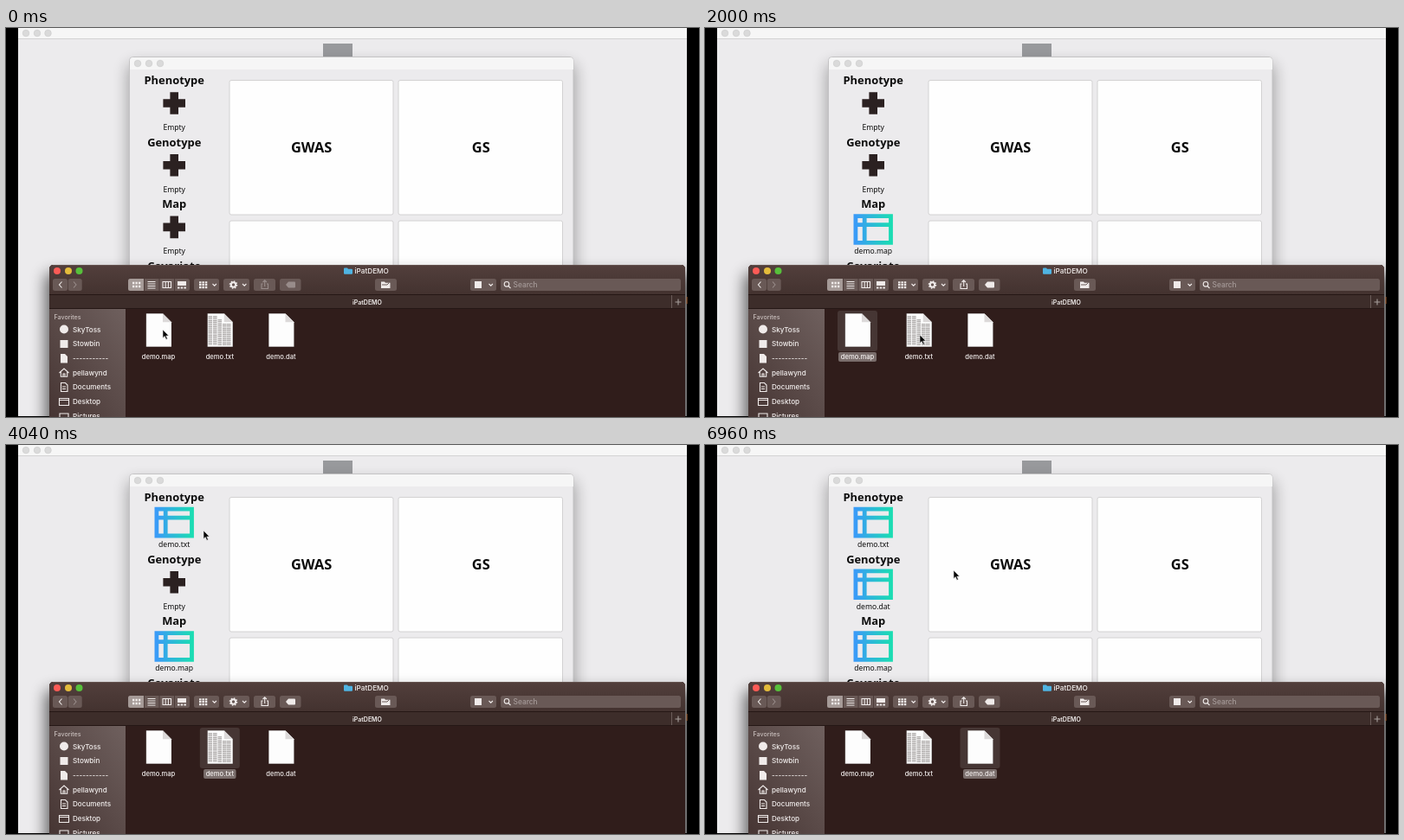
An HTML page that plays this animation: 800x450 px, repeating every 7000 ms.

```html
<!DOCTYPE html>
<html lang="en">
<head>
<meta charset="utf-8">
<style>
html, body { margin: 0; width: 100%; height: 100%; overflow: hidden; background: #000; }
svg { display: block; width: 800px; height: 450px; }
text { font-family: Inter, Roboto, sans-serif; fill: #f3efee; font-weight: 500; }
.app text { font-family: "Noto Sans", "Open Sans", sans-serif; fill: #0c0c0c; font-weight: 400; font-size: 8.6px; text-anchor: middle; }
.app .head { font-weight: 700; font-size: 12.9px; }
.app .big { font-weight: 700; font-size: 16.4px; }
.mid { text-anchor: middle; }
.side text { font-size: 8.1px; }
.btn { fill: #695956; }
.ico { fill: none; stroke: #f0ebea; stroke-width: 1.1; }
.solid { fill: #f0ebea; }
</style>
</head>
<body>
<svg viewBox="0 0 800 450" xmlns="http://www.w3.org/2000/svg">
  <defs>
    <linearGradient id="bar" x2="0" y2="1"><stop stop-color="#523f3c"/><stop offset="1" stop-color="#43322f"/></linearGradient>
    <linearGradient id="sideFill" y1="1" x2="1" y2="0"><stop stop-color="#463533"/><stop offset="1" stop-color="#6f605e"/></linearGradient>
    <linearGradient id="aqua"><stop stop-color="#3a9bf7"/><stop offset="1" stop-color="#1bdcb3"/></linearGradient>
    <filter id="soft" x="-20%" y="-20%" width="140%" height="140%"><feGaussianBlur stdDeviation="9"/></filter>
    <clipPath id="stage"><rect x="14" width="772" height="449"/></clipPath>
  </defs>

  <g class="app" clip-path="url(#stage)">
    <path fill="#ecebed" d="M14 0h772v450H14z"/>
    <path fill="#f6f6f6" d="M14 0h772v12H14z"/>
    <path fill="#d3d2d3" d="M14 12h772v1H14z"/>
    <g fill="#dadada" stroke="#c9c9c9" stroke-width=".6"><circle cx="23" cy="6" r="3.8"/><circle cx="36" cy="6" r="3.8"/><circle cx="48.5" cy="6" r="3.8"/></g>
    <rect x="366" y="18" width="34" height="34" fill="#98999c"/>
    <rect x="141" y="42" width="516" height="430" rx="5" opacity=".32" filter="url(#soft)"/>
    <rect x="142.5" y="33.5" width="512.5" height="430" rx="4" fill="#ecebed" stroke="#c4c3c4"/>
    <path fill="#f6f6f6" d="M143 48V38q0-4 4-4h504q4 0 4 4v10z"/>
    <g fill="#dadada" stroke="#c9c9c9" stroke-width=".6"><circle cx="152" cy="41" r="3.8"/><circle cx="165" cy="41" r="3.8"/><circle cx="178" cy="41" r="3.8"/></g>
    <g fill="#fefefe" stroke="#d2d1d2">
      <rect x="258" y="60.5" width="189" height="155.5" rx="2"/><rect x="453" y="60.5" width="189.5" height="155.5" rx="2"/>
      <rect x="258" y="223" width="189" height="155.5" rx="2"/><rect x="453" y="223" width="189.5" height="155.5" rx="2"/>
    </g>
    <text class="big" x="352.7" y="144">GWAS</text>
    <text class="big" x="548.3" y="144">GS</text>
    <g id="rows"></g>
  </g>

  <g clip-path="url(#stage)"><rect x="46" y="284" width="748" height="200" rx="5" opacity=".62" filter="url(#soft)"/></g>
  <path fill="#a8602f" d="M785.500 311h1v8h-1z"/>
  <g id="finder">
    <path fill="#301d1b" d="M50 450V279q0-5 5-5h724q5 0 5 5v171z"/>
    <path fill="url(#bar)" d="M50 309V279q0-5 5-5h724q5 0 5 5v30z"/>
    <path fill="#6a5854" d="M54 274h726v.8H54z"/>
    <path fill="#3d2d2a" d="M50 309h734v16H50z"/>
    <path stroke="#251715" d="M50 308.5h734M50 324.5h734"/>
    <path stroke="#6b5c59" d="M768.5 309v15"/>
    <path class="ico" d="M772.5 317h7M776 313.5v7" opacity=".6"/>
    <path fill="url(#sideFill)" d="M50 325h88v125H50z"/>
    <circle cx="59" cy="281" r="4" fill="#fc5b56"/><circle cx="72" cy="281" r="4" fill="#e4bc3b"/><circle cx="84.5" cy="281" r="4" fill="#57c13b"/>
    <path fill="#4fb4e2" d="M390 278.5q0-1 1-1h3l1 1.2h4q1 0 1 1v4q0 1-1 1h-8q-1 0-1-1z"/>
    <text x="402.5" y="284" font-size="8.2">iPatDEMO</text>
    <text class="mid" x="417" y="319.5" font-size="7" style="font-weight:600">iPatDEMO</text>

    <g id="buttons"></g>
    <path class="ico" d="M64.5 293.5l-3 3.5 3 3.5"/>
    <path class="ico" opacity=".35" d="M78 293.5l3 3.5-3 3.5"/>
    <path fill="#a59a97" d="M143.5 290h15.5v14h-15.5q-2.500 0-2.500-2.500v-9q0-2.500 2.500-2.500z"/>
    <path stroke="#4c3b38" d="M159.5 290v14M177 290v14M194.5 290v14"/>
    <path class="ico" style="stroke-width:2.3" stroke-dasharray="2.3 1.2" d="M146 295h9.5M146 299h9.5"/>
    <path class="ico" d="M163.5 293.5h9M163.5 296h9M163.5 298.5h9M163.5 301h9"/>
    <path class="ico" d="M181 293.5h9.5v7H181zM184.2 293.5v7M187.4 293.5v7"/>
    <path class="solid" d="M198 293h10v5h-10zM198 299.5h2.5v2H198zM201.7 299.5h2.5v2h-2.5zM205.4 299.5h2.5v2h-2.5z"/>
    <path class="ico" style="stroke-width:2.2" stroke-dasharray="2.5 .9" d="M223 294.3h9.5M223 297.2h9.5M223 300.1h9.5"/>
    <circle class="ico" style="stroke-width:2" cx="262.5" cy="297" r="2.7"/>
    <circle class="ico" style="stroke-width:1.6" stroke-dasharray="1.5 1.62" cx="262.5" cy="297" r="4"/>
    <path class="ico" d="M238.5 296l2.2 2.2 2.2-2.2M273 296l2.2 2.2 2.2-2.2M557.5 296l2.2 2.2 2.2-2.2"/>
    <g id="actions">
      <path class="ico" d="M296.5 296H295v5.5h7.5V296H301M298.7 299v-7M296.5 294l2.2-2.2 2.2 2.2"/>
      <path class="solid" d="M323 297l3-3.5h7q1 0 1 1v5q0 1-1 1h-7z"/>
    </g>
    <path class="solid" d="M433 293.5h4l1 1.2h5.5v6.3H433z"/>
    <path stroke="#695956" fill="none" d="M434 297h6l2-2"/>
    <rect class="solid" x="541" y="293" width="8" height="8"/>
    <circle class="ico" cx="578" cy="296.3" r="2.8"/><path class="ico" d="M580 298.5l2.5 2.5"/>
    <text x="585.5" y="300" font-size="8.4" style="fill:#a59a98">Search</text>

    <g class="side">
      <text x="55.5" y="337" style="font-size:7.1px;fill:#c9bfbd">Favorites</text>
      <g id="places"></g>
      <circle class="solid" cx="67" cy="348.5" r="5"/>
      <rect class="solid" x="62.5" y="361" width="9" height="9"/>
      <path class="solid" d="M63 377h5l3 3v7.5h-8z"/>
      <path class="ico" d="M61.5 399l5.5-5 5.5 5M63.3 398v5.3h7.4V398M66 403v-3h2v3"/>
      <path class="ico" d="M63.5 410.5h5l2.5 2.5v7.5h-7.5zM65 415h4M65 417.5h4"/>
      <path class="ico" d="M61.5 428.5h11v8h-11zM61.5 430.5h11"/>
      <path class="ico" d="M62 446h10v8H62z"/>
    </g>
    <g id="files"></g>
  </g>
  <g id="ghost" opacity=".82"></g>
  <circle id="ring" r="13.7" fill="#fff" fill-opacity=".12" stroke="#1a1a1a" stroke-width="1.1"/>
  <path id="arrow" d="M0 0v9.6l2.2-2 1.6 3.7 1.6-.7-1.6-3.5 3-.2z" fill="#060606" stroke="#e8e8e8" stroke-width=".6"/>
</svg>
<script>
const LOOP = 7000, STEP = 40, PITCH = 71.7;
const $ = id => document.getElementById(id);
const show = (el, on) => el.style.display = on ? '' : 'none';

const files = [
  { name: 'demo.map', x: 176, width: 44, row: 2, press: 200, drop: 1000 },
  { name: 'demo.txt', x: 246.8, width: 37.5, row: 0, press: 2120, drop: 3440 },
  { name: 'demo.dat', x: 317.5, width: 39, row: 1, press: 4880, drop: 6120 }
];

// Pointer path: time, x, y
const path = [
  [0, 181, 349], [120, 181, 349], [200, 179, 341], [520, 201, 242], [680, 198, 232],
  [1080, 198, 232], [1900, 248, 355], [2160, 248, 355], [2800, 217, 145], [3200, 203, 88],
  [3560, 203, 88], [3900, 228, 99], [4200, 228, 99], [4800, 309, 346], [4960, 309, 346],
  [5240, 265, 224], [5720, 204, 156], [6200, 204, 156], [6640, 287, 145], [7000, 287, 145]
];

const slope = (i, k) => path[i + 1] && path[i]
  ? (path[i + 1][k] - path[i][k]) / (path[i + 1][0] - path[i][0]) : 0;

function tangent(i, k) {
  const a = slope(i - 1, k), b = slope(i, k);
  return a * b > 0 ? 2 * a * b / (a + b) : 0;
}

// Monotone cubic interpolation along the pointer path
function pointer(t) {
  const i = path.findIndex(p => p[0] > t) - 1;
  const d = path[i + 1][0] - path[i][0], u = (t - path[i][0]) / d, v = 1 - u;
  return [1, 2].map(k =>
    path[i][k] * (1 + 2 * u) * v * v + tangent(i, k) * d * u * v * v +
    path[i + 1][k] * u * u * (3 - 2 * u) - tangent(i + 1, k) * d * u * u * v);
}

const rows = ['Phenotype', 'Genotype', 'Map', 'Covariate'].map((title, i) => {
  const y = 87 + i * PITCH;
  const g = document.createElementNS('http://www.w3.org/2000/svg', 'g');
  g.setAttribute('transform', `translate(194.2 ${y})`);
  g.innerHTML = `<text class="head" y="-22">${title}</text>
    <path class="plus" d="M-4.8-12.8h9.600v8h8v9.600h-8v8h-9.600v-8h-8v-9.600h8z"/>
    <path class="table" fill="none" stroke="url(#aqua)" stroke-width="4.800"
      d="M-20.300-12.800h40.600v30.800h-40.600zM-10-12.800v30.800M-20.300-2.800h40.600"/>
    <text class="note" y="31">Empty</text>`;
  $('rows').append(g);
  const [plus, table, note] = ['.plus', '.table', '.note'].map(s => g.querySelector(s));
  return { plus, table, note, y };
});

$('buttons').innerHTML = [[54, 17], [71.7, 16], [141, 71], [217, 29], [251, 30], [286, 25], [316, 24.5], [426, 25], [536, 30], [571, 208]]
  .map(([x, w]) => `<rect class="btn" x="${x}" y="290" width="${w}" height="14" rx="2.5"/>`).join('');

$('places').innerHTML = ['SkyToss', 'Stowbin', '-----------', 'pellawynd', 'Documents', 'Desktop', 'Pictures']
  .map((s, i) => `<text x="77" y="${351.7 + i * 16.65}">${s}</text>`).join('');

function sheet(f) {
  const lines = f.name.endsWith('txt')
    ? `<path fill="none" stroke="#b3b0af" stroke-width="4.6" stroke-dasharray="1.2 .5"
        d="M-11-17v34M-5.5-17v34M0-13v30M5.5-8v25M10.5-8v25"/>` : '';
  return `<path fill="#fdfdfd" stroke="#000" stroke-opacity=".16" stroke-width=".8" d="M-14.200-19.800H5L15-9.800V18.800h-29.200z"/>${lines}
    <path fill="#dcd9d9" d="M5-19.800v10H15z"/>`;
}
const label = f => `<text class="mid" y="33" font-size="7.6">${f.name}</text>`;
const plate = (f, color) => `<rect x="${-f.width / 2}" y="25" width="${f.width}" height="11" rx="2" fill="${color}"/>`;

$('files').innerHTML = files.map(f => `<g transform="translate(${f.x} 350)">
  <g class="sel"><rect x="-23" y="-23" width="46" height="47" rx="3" fill="#463634"/>${plate(f, '#7a6e6c')}</g>
  ${sheet(f)}${label(f)}</g>`).join('');
const marks = [...document.querySelectorAll('.sel')];

$('ghost').innerHTML = files.map(f => `<g>${sheet(f)}${plate(f, '#625c5d')}${label(f)}</g>`).join('');
const ghosts = [...$('ghost').children];

function draw(t) {
  const [x, y] = pointer(t);
  const picked = files.filter(f => t >= f.press).length - 1;
  const held = files.findIndex(f => t >= f.press && t < f.drop);

  rows.forEach((r, i) => {
    const loaded = files.find(f => f.row === i && t >= f.drop);
    const over = held >= 0 && x > 160 && x < 230 && y > r.y - 20 && y < r.y + 11;
    show(r.plus, !loaded);
    show(r.table, loaded);
    r.plus.setAttribute('fill', over ? '#2adccb' : '#2b2121');
    r.note.textContent = loaded ? loaded.name : 'Empty';
  });
  marks.forEach((m, i) => show(m, i === picked));
  ghosts.forEach((g, i) => show(g, i === held));
  if (held >= 0) {
    const f = files[held], [px, py] = pointer(f.press);
    ghosts[held].setAttribute('transform', `translate(${f.x + x - px} ${350 + y - py})`);
  }
  show($('ring'), held >= 0);
  $('actions').setAttribute('opacity', picked < 0 ? .35 : 1);
  for (const id of ['ring', 'arrow']) $(id).setAttribute('transform', `translate(${x} ${y})`);
}

const start = performance.now();
function tick() {
  const t = (performance.now() - start) % LOOP;
  draw(Math.floor(t / STEP) * STEP);
  requestAnimationFrame(tick);
}
tick();
</script>
</body>
</html>
```
